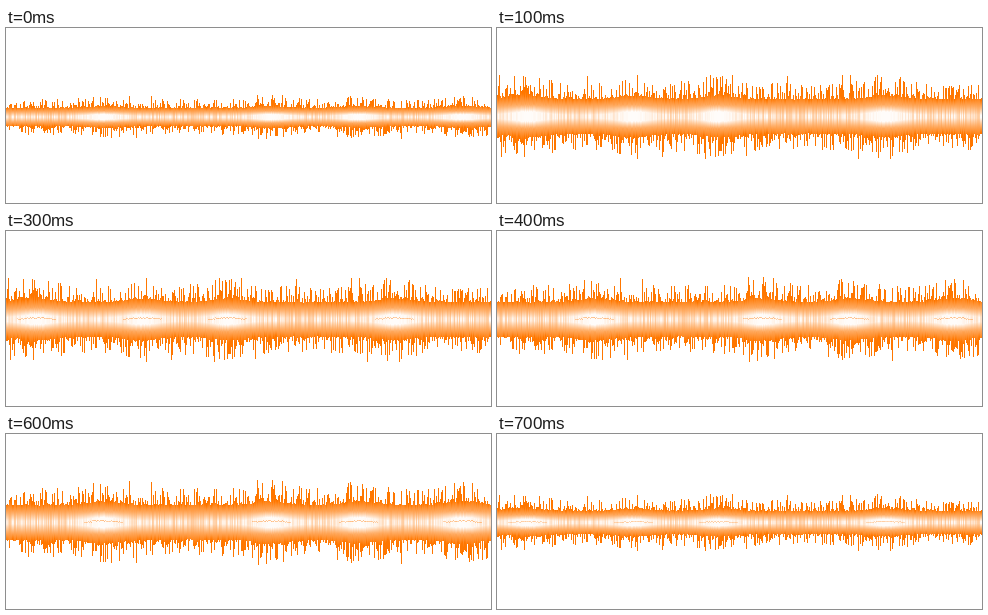
Animation, 485 px wide and 175 px high, one loop 900 ms. Source, as an HTML page with a canvas:

```html
<!DOCTYPE html>
<html>
<head>
<meta charset="utf-8">
<style>
  html, body { margin: 0; width: 100%; height: 100%; overflow: hidden; background: #fff; }
  canvas { display: block; }
</style>
</head>
<body>
<canvas width="485" height="175"></canvas>
<script>
const W = 485, H = 175, LOOP = 900;
const ctx = document.querySelector('canvas').getContext('2d');

function random(seed) {
  return () => {
    seed = (seed + 0x6D2B79F5) | 0;
    let t = Math.imul(seed ^ (seed >>> 15), 1 | seed);
    t = (t + Math.imul(t ^ (t >>> 7), 61 | t)) ^ t;
    return ((t ^ (t >>> 14)) >>> 0) / 4294967296;
  };
}

const orange = a => `rgb(255,${Math.round(255 - 136 * a)},${Math.round(255 - 255 * a)})`;

// One noisy signal: swells make it louder and brighter, peaks are the tallest spikes.
function makeWave(seed, swells, topPeaks, lowPeaks) {
  const rnd = random(seed);
  const reach = (x, swell, peaks) => {
    const r = rnd();
    if (peaks.includes(x)) return 0.94 + 0.06 * r;
    return Math.min(0.93, (0.43 + 0.44 * r ** 2.4) * (0.93 + 0.2 * swell));
  };
  return Array.from({ length: W }, (_, x) => {
    const swell = swells.reduce((s, p) => s + Math.exp(-(((x - p) / 24) ** 2)), 0);
    return {
      swell,
      up: reach(x, swell, topPeaks),
      down: reach(x, swell, lowPeaks),
      tone: rnd(),
      jitter: rnd()
    };
  });
}

const A = makeWave(11, [30, 136, 221, 388],
  [2, 17, 26, 90, 140, 213, 225, 235, 290, 345, 353, 380],
  [4, 27, 140, 165, 208, 218, 249, 361, 381, 393]);
const B = makeWave(29, [97, 265, 352, 456],
  [123, 145, 251, 266, 276, 344, 457],
  [105, 130, 252, 260, 345, 395]);

// start time, wave, half height, centre line, strength of the thin ridge
const steps = [
  [0, B, 22, 89, 0],
  [100, A, 42.5, 88.5, 0],
  [200, A, 61, 86, 0.8],
  [300, A, 42.5, 88.5, 0.5],
  [400, B, 42.5, 88.5, 0.5],
  [500, B, 61, 86, 0.7],
  [600, B, 42.5, 88.5, 0.5],
  [700, A, 28.5, 88.5, 0.4]
];

function draw([, wave, amp, mid, ridge]) {
  ctx.fillStyle = '#fff';
  ctx.fillRect(0, 0, W, H);
  wave.forEach(({ swell, up, down, tone, jitter }, x) => {
    const glow = amp * (0.38 + 0.14 * tone + 0.08 * swell);
    const core = 0.04 + 0.07 * Math.min(1, swell);
    const tint = 0.38 * tone * Math.max(0, 1 - swell) + 0.02;
    const g = ctx.createLinearGradient(0, mid - glow, 0, mid + glow);
    g.addColorStop(0, orange(1));
    g.addColorStop(0.25, orange(0.5 + 0.2 * tone));
    g.addColorStop(0.5 - core, orange(tint));
    g.addColorStop(0.5 + core, orange(tint));
    g.addColorStop(0.75, orange(0.5 + 0.2 * tone));
    g.addColorStop(1, orange(1));
    ctx.fillStyle = g;
    const top = Math.round(mid - amp * up);
    ctx.fillRect(x, top, 1, Math.round(mid + amp * down) - top);

    if (ridge && swell > 0.52) {
      const lift = (swell - 0.52) * amp * 0.07 + jitter * amp * 0.03;
      ctx.fillStyle = orange(ridge * (0.6 + 0.4 * tone));
      ctx.fillRect(x, Math.round(mid + (amp > 50 ? 1 : 0) - lift), 1, 1);
    }
  });
}

let shown;
function tick(now) {
  const t = now % LOOP;
  const step = steps.findLast(s => s[0] <= t);
  if (step !== shown) draw(shown = step);
  requestAnimationFrame(tick);
}
tick(performance.now());
</script>
</body>
</html>
```
